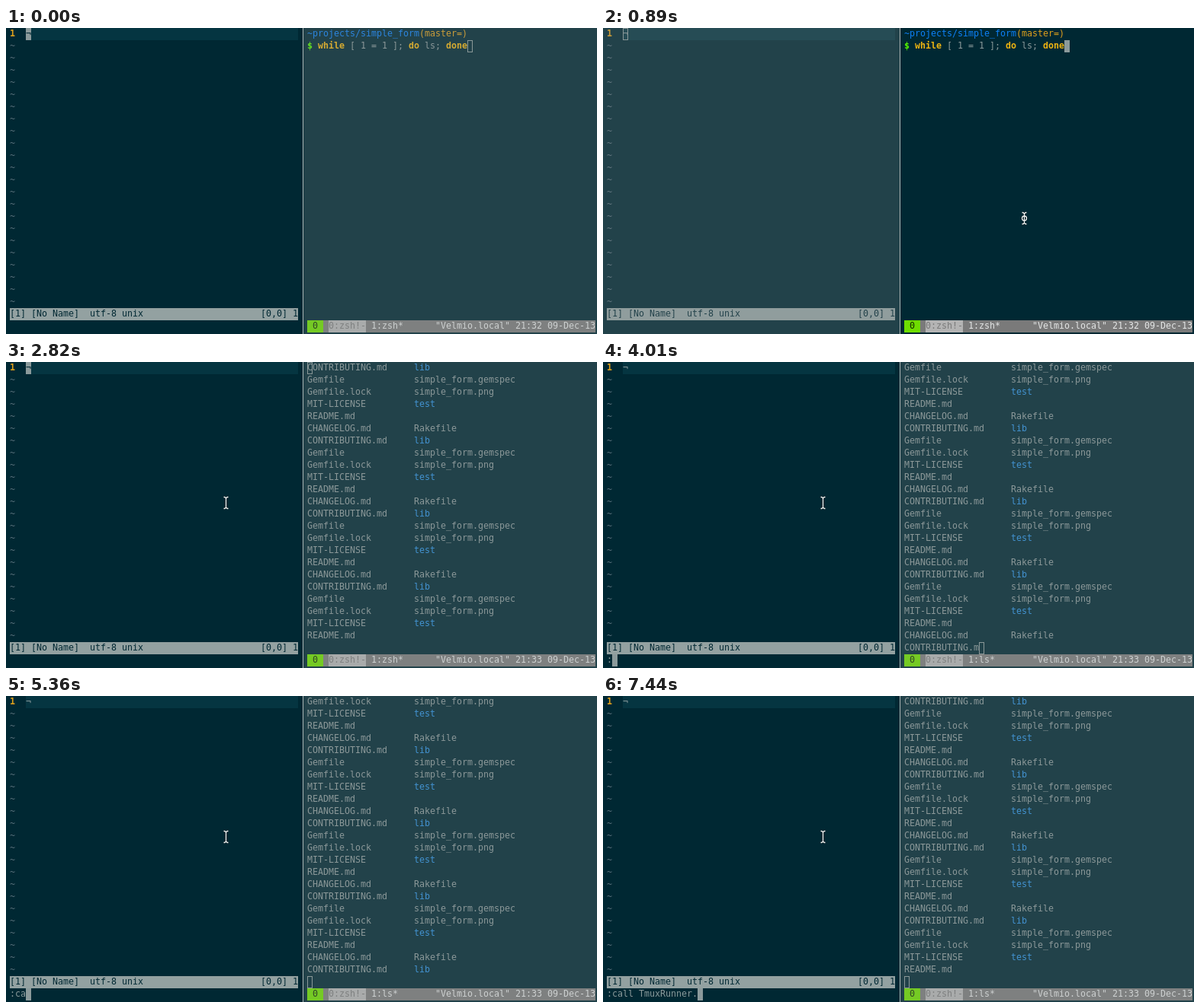
Recreate the animation shown at these times as an HTML page with a canvas. Size 775 px wide and 402 px high, loop 8000 ms.

```html
<!DOCTYPE html>
<html lang="en">
<head>
<meta charset="utf-8">
<title>Split terminal</title>
<style>
html, body { margin: 0; width: 100%; height: 100%; overflow: hidden; background: #002833; }
canvas { display: block; }
</style>
</head>
<body>
<canvas id="stage" width="775" height="402"></canvas>
<script>
const ctx = document.getElementById('stage').getContext('2d');
const LOOP = 8000, CW = 7, RH = 16, LEFT = 5, RIGHT = 395, SPLIT = 389;
const FONT = '11.63px "DejaVu Sans Mono", monospace';
const C = {
  bg: '#002833', line: '#053541', text: '#8b9a9b', tilde: '#58707a',
  orange: '#dfa01c', yellow: '#edb312', green: '#55f500', blue: '#0c80f8',
  dir: '#2b93e6', bar: '#93a1a1', tmux: '#7a7a7a', tab: '#b4b4b4',
  session: '#6fdd00', light: '#e4e6e6', veil: 'rgba(134,142,142,.25)'
};

const listing = [
  ['CHANGELOG.md', 'Rakefile'], ['CONTRIBUTING.md', 'lib'],
  ['Gemfile', 'simple_form.gemspec'], ['Gemfile.lock', 'simple_form.png'],
  ['MIT-LICENSE', 'test'], ['README.md', '']
];

// time, list offset, cursor row, cursor column
const output = [
  [1640, 3, 23, 0], [1790, 1, 23, 0], [1940, 4, 23, 0], [2080, 2, 23, 0],
  [2220, 5, 23, 0], [2370, 1, 23, 0], [2820, 1, 0, 0], [2960, 1, 23, 0],
  [3710, 4, 23, 0], [3860, 0, 23, 0], [4010, 2, 23, 14], [4160, 3, 23, 0],
  [4310, 1, 23, 0], [4460, 4, 23, 0], [4910, 5, 23, 0], [5060, 2, 23, 0],
  [5210, 0, 23, 0], [5360, 3, 23, 0], [5500, 1, 23, 0], [5650, 4, 23, 0],
  [5800, 1, -1, 0], [5950, 1, 23, 0]
];

const typing = [
  [3710, ':'], [4910, ':s'], [5060, ':'], [5210, ':c'], [5360, ':ca'],
  [5500, ':cal'], [5650, ':call'], [5800, ':call '], [5950, ':call T'],
  [6100, ':call Tm'], [6250, ':call Tmux'], [6700, ':call TmuxR'],
  [6850, ':call TmuxRu'], [7000, ':call TmuxRun'], [7140, ':call TmuxRunn'],
  [7290, ':call TmuxRunne'], [7440, ':call TmuxRunner.']
];

const pointer = [
  [450, 551, 260], [590, 552, 250], [1790, 510, 240], [1940, 438, 222],
  [2080, 356, 202], [2220, 305, 190], [2370, 288, 185]
];

const windowName = [[0, 'zsh'], [3260, 'ls'], [6250, 'zsh'], [7140, 'ls']];

const at = (steps, t) => steps.filter(s => s[0] <= t).pop();

function box(x, y, w, h, color) {
  ctx.fillStyle = color;
  ctx.fillRect(x, y, w, h);
}

function put(x0, col, row, str, color, bold) {
  ctx.font = (bold ? 'bold ' : '') + FONT;
  ctx.fillStyle = color;
  [...str].forEach((ch, i) => {
    if (ch !== ' ') ctx.fillText(ch, x0 + (col + i) * CW, row * RH + 11);
  });
}

function cells(x0, col, row, count, color) {
  box(x0 + col * CW, row * RH, count * CW, RH, color);
}

function cursor(x0, col, row, solid) {
  if (solid) return cells(x0, col, row, 1, C.text);
  ctx.strokeStyle = C.text;
  ctx.lineWidth = 1;
  ctx.strokeRect(x0 + col * CW + .5, row * RH + .5, CW - 1, RH - 1);
}

function drawEditor(t, active) {
  box(0, 0, SPLIT, 402, C.bg);
  cells(LEFT, 3, 0, 51, C.line);
  put(LEFT, 0, 0, '1', C.orange, true);
  for (let r = 1; r < 23; r++) put(LEFT, 0, r, '~', C.tilde);
  const cmd = at(typing, t);
  const block = active && !cmd;
  if (!cmd) cursor(LEFT, 3, 0, active);
  put(LEFT, 3, 0, '¬', block ? C.bg : C.text);
  cells(LEFT, 0, 23, 54, C.bar);
  put(LEFT, 0, 23, '[1] [No Name]  utf-8 unix', C.bg);
  put(LEFT, 47, 23, '[0,0] 1', C.bg);
  if (cmd) {
    put(LEFT, 0, 24, cmd[1], C.text);
    cursor(LEFT, cmd[1].length, 24, true);
  }
}

function drawPrompt(active) {
  put(RIGHT, 0, 0, '~projects/simple_form', C.blue);
  put(RIGHT, 21, 0, '(master=)', C.orange);
  put(RIGHT, 0, 1, '$', C.green, true);
  put(RIGHT, 2, 1, 'while', C.yellow, true);
  put(RIGHT, 8, 1, '[ 1 = 1 ];', C.text);
  put(RIGHT, 19, 1, 'do', C.yellow, true);
  put(RIGHT, 22, 1, 'ls;', C.text);
  put(RIGHT, 26, 1, 'done', C.yellow, true);
  cursor(RIGHT, 30, 1, active);
}

function drawListing([, offset, row, col], active) {
  for (let r = 0; r < 23; r++) {
    // a half-finished redraw leaves the bottom rows one line behind
    const shift = row < 0 && r >= 20 ? offset - 1 : offset;
    const [first, second] = listing[(r + shift) % 6];
    put(RIGHT, 0, r, first, C.text);
    put(RIGHT, 20, r, second, /^(lib|test)$/.test(second) ? C.dir : C.text);
  }
  if (col) put(RIGHT, 0, row, listing[(row + offset) % 6][0].slice(0, col), C.text);
  if (row >= 0) cursor(RIGHT, col, row, active);
}

function drawTmuxBar(t) {
  cells(RIGHT, 0, 24, 54, C.tmux);
  cells(RIGHT, 0, 24, 3, C.session);
  put(RIGHT, 1, 24, '0', '#143000');
  cells(RIGHT, 4, 24, 7, C.tab);
  put(RIGHT, 4, 24, '0:zsh!-', C.tmux);
  put(RIGHT, 12, 24, `1:${at(windowName, t)[1]}*`, C.light);
  const clock = t < 2080 ? '21:32' : '21:33';
  put(RIGHT, 24, 24, `"Velmio.local" ${clock} 09-Dec-13`, C.light);
}

function drawShell(t, active) {
  box(SPLIT + 1, 0, 385, 402, C.bg);
  const state = at(output, t);
  if (state) drawListing(state, active);
  else drawPrompt(active);
  drawTmuxBar(t);
}

function drawPointer([, x, y]) {
  ctx.save();
  ctx.translate(x + .5, y);
  const shape = new Path2D('M-3-7.5H-1.5L0-6L1.5-7.5H3M0-6V6M-3 7.5H-1.5L0 6L1.5 7.5H3');
  if (x > SPLIT) shape.addPath(new Path2D('M3 0A3 3 0 1 1-3 0A3 3 0 1 1 3 0'));
  ctx.strokeStyle = 'rgba(0,0,0,.45)';
  ctx.lineWidth = 2.6;
  ctx.stroke(shape);
  ctx.strokeStyle = '#f4f6f6';
  ctx.lineWidth = 1.3;
  ctx.stroke(shape);
  ctx.restore();
}

function draw(t) {
  const shellActive = t >= 890 && t < 2820;
  drawEditor(t, !shellActive);
  drawShell(t, shellActive);
  if (shellActive) box(0, 0, SPLIT, 402, C.veil);
  else box(SPLIT + 1, 0, 385, 402, C.veil);
  box(SPLIT, 0, 1, 402, '#aeb6b6');
  const mouse = at(pointer, t);
  if (mouse) drawPointer(mouse);
}

const start = performance.now();
function tick() {
  draw((performance.now() - start) % LOOP);
  requestAnimationFrame(tick);
}
tick();
</script>
</body>
</html>
```
